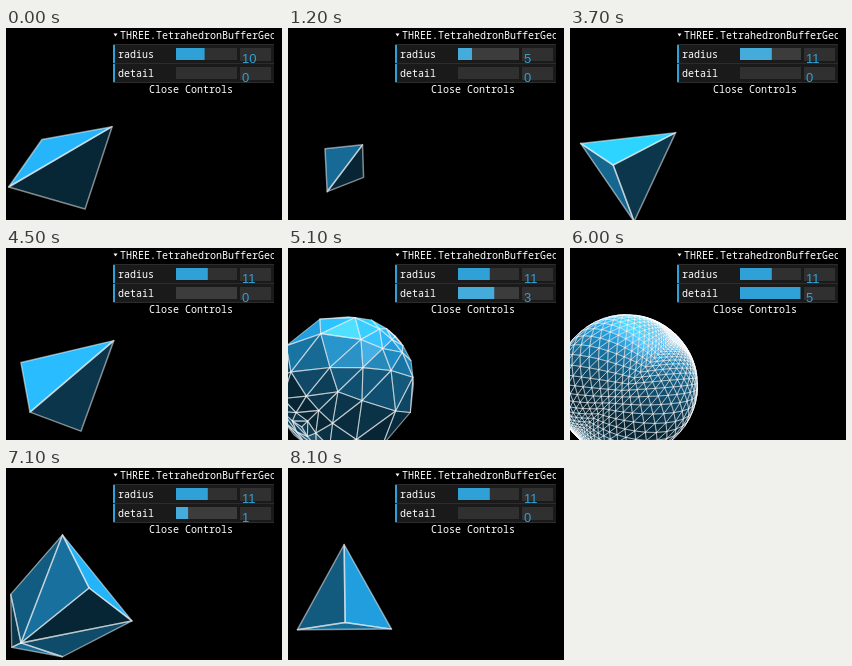
Recreate the animation shown at these times as an HTML page with a canvas. Size 276 px wide and 192 px high, loop 8200 ms.

```html
<!DOCTYPE html>
<html lang="en">
<head>
<meta charset="utf-8">
<title>Tetrahedron geometry</title>
<style>
html, body { margin: 0; width: 100%; height: 100%; overflow: hidden; background: #000; }
canvas, svg { position: absolute; left: 0; top: 0; }
.label { font: 10px "Noto Sans Mono", "DejaVu Sans Mono", monospace; fill: #fff; }
.value { font: 13px "Liberation Sans", Arial, sans-serif; fill: #2fa1d6; }
.track { fill: #303030; }
.fill { fill: #2fa1d6; }
.hover .track { fill: #3c3c3c; }
.hover .fill { fill: #44abda; }
</style>
</head>
<body>
<canvas id="view" width="276" height="192"></canvas>
<svg width="276" height="192">
  <rect x="107" width="162" height="70"/>
  <path d="M107.500 5.500h4l-2 3z" fill="#fff"/>
  <svg width="268" height="16"><text class="label" x="114" y="11">THREE.TetrahedronBufferGeometry</text></svg>
  <rect x="107" y="16" width="161" height="1" fill="#2c2c2c"/>
  <g id="rows"></g>
  <text class="label" x="143" y="65">Close Controls</text>
</svg>
<script>
const LOOP = 8200, STEP = 100;
const CX = 56.5, CY = 137.7, FOCAL = 180.5, CAMERA = 30;
const ctx = document.getElementById('view').getContext('2d');

const radiusKeys = [[0, 10], [500, 10], [900, 9.4], [1200, 5.4], [1800, 8], [2700, 15], [3200, 13], [3600, 11]];
const detailKeys = [[0, 0], [4600, 1], [4800, 2], [5000, 3], [5500, 4], [5800, 5],
  [6400, 4], [6500, 3], [6700, 2], [6900, 1], [7200, 0]];
const lights = [[0, 200, 0], [100, 200, 100], [-100, -200, -100]];
const diffuse = [21, 98, 137], emissive = [7, 37, 52];

const add = (a, b) => a.map((v, i) => v + b[i]);
const sub = (a, b) => a.map((v, i) => v - b[i]);
const dot = (a, b) => a[0] * b[0] + a[1] * b[1] + a[2] * b[2];
const scale = (a, k) => a.map(v => v * k);
const unit = a => scale(a, 1 / Math.hypot(...a));
const cross = (a, b) => [a[1] * b[2] - a[2] * b[1], a[2] * b[0] - a[0] * b[2], a[0] * b[1] - a[1] * b[0]];

// Unit tetrahedron, each face split into 4^detail triangles and pushed onto the sphere
function tetrahedron(detail) {
  const [a, b, c, d] = [[1, 1, 1], [-1, -1, 1], [-1, 1, -1], [1, -1, -1]];
  const n = 2 ** detail, points = [], triangles = [];
  for (const [p, q, r] of [[c, b, a], [a, d, c], [b, d, a], [c, d, b]]) {
    const grid = [];
    for (let i = 0; i <= n; i++) {
      grid[i] = [];
      for (let j = 0; j <= n - i; j++) {
        grid[i][j] = points.length;
        points.push(unit(add(add(scale(p, n - i - j), scale(q, j)), scale(r, i))));
      }
    }
    for (let i = 0; i < n; i++) {
      for (let j = 0; j < n - i; j++) {
        triangles.push([grid[i][j], grid[i][j + 1], grid[i + 1][j]]);
        if (j < n - i - 1) triangles.push([grid[i][j + 1], grid[i + 1][j + 1], grid[i + 1][j]]);
      }
    }
  }
  return { points, triangles };
}
const solids = [0, 1, 2, 3, 4, 5].map(tetrahedron);

function shade(center, normal) {
  const eye = unit(sub([0, 0, CAMERA], center));
  let lit = 0, shine = 0;
  for (const light of lights) {
    const dir = unit(sub(light, center));
    const amount = Math.max(0, dot(normal, dir));
    lit += amount;
    shine += 68 * amount * Math.max(0, dot(normal, unit(add(dir, eye)))) ** 30;
  }
  return `rgb(${diffuse.map((v, i) => Math.min(255, Math.round(emissive[i] + v * lit + shine)))})`;
}

function drawSolid(angle, radius, detail) {
  const c = Math.cos(angle), s = Math.sin(angle);
  const { points, triangles } = solids[detail];
  const world = points.map(([x, y, z]) => {
    const depth = z * c - x * s;
    return scale([x * c + z * s, y * c - depth * s, y * s + depth * c], radius);
  });
  const screen = world.map(([x, y, z]) => {
    const k = FOCAL / (CAMERA - z);
    return [CX + x * k, CY - y * k];
  });
  const faces = [];
  ctx.clearRect(0, 0, 276, 192);
  for (const tri of triangles) {
    const [p, q, r] = tri.map(i => world[i]);
    const center = scale(add(add(p, q), r), 1 / 3);
    let normal = unit(cross(sub(q, p), sub(r, p)));
    if (dot(normal, center) < 0) normal = scale(normal, -1);
    if (dot(normal, sub([0, 0, CAMERA], center)) <= 0) continue;
    const face = new Path2D();
    tri.forEach(i => face.lineTo(...screen[i]));
    face.closePath();
    ctx.fillStyle = shade(center, normal);
    ctx.fill(face);
    faces.push(face);
  }
  // Shared edges are stroked twice, so they come out brighter than the outline
  ctx.strokeStyle = 'rgba(255,255,255,.5)';
  ctx.lineWidth = 1.5 - 0.13 * detail;
  ctx.lineJoin = 'round';
  faces.forEach(face => ctx.stroke(face));
}

function makeRow(name, y) {
  const row = document.createElementNS('http://www.w3.org/2000/svg', 'g');
  row.setAttribute('transform', `translate(0 ${y})`);
  row.innerHTML = `<rect x="107" width="161" height="18" fill="#1a1a1a"/>
    <rect x="107" y="18" width="161" height="1" fill="#2c2c2c"/>
    <rect x="107" width="2" height="18" fill="#2fa1d6"/>
    <text class="label" x="112" y="13">${name}</text>
    <rect class="track" x="170" y="3" width="61" height="12"/>
    <rect class="fill" x="170" y="3" height="12"/>
    <rect x="234" y="3" width="31" height="13" fill="#303030"/>
    <text class="value" x="236" y="18"></text>`;
  document.getElementById('rows').append(row);
  const fill = row.querySelector('.fill'), text = row.querySelector('.value');
  return (value, part, hover) => {
    fill.setAttribute('width', 60.4 * part);
    text.textContent = Math.round(value);
    row.setAttribute('class', hover ? 'hover' : '');
  };
}
const setRadius = makeRow('radius', 17), setDetail = makeRow('detail', 36);

function radiusAt(t) {
  const i = radiusKeys.findIndex(k => k[0] > t);
  if (i < 0) return radiusKeys.at(-1)[1];
  const [t0, a] = radiusKeys[i - 1], [t1, b] = radiusKeys[i];
  return a + (b - a) * (t - t0) / (t1 - t0);
}

function render(now) {
  const t = Math.floor(now % LOOP / STEP) * STEP;
  const radius = radiusAt(t);
  const detail = detailKeys.findLast(k => k[0] <= t)[1];
  drawSolid(1.332 + 0.0003195 * t, radius, detail);
  setRadius(radius, (radius - 1) / 19, t >= 500 && t < 3900);
  setDetail(detail, detail / 5, t >= 4500 && t < 5800 || t >= 6400 && t < 7600);
}

const start = performance.now();
function tick() {
  render(performance.now() - start);
  requestAnimationFrame(tick);
}
tick();
</script>
</body>
</html>
```
